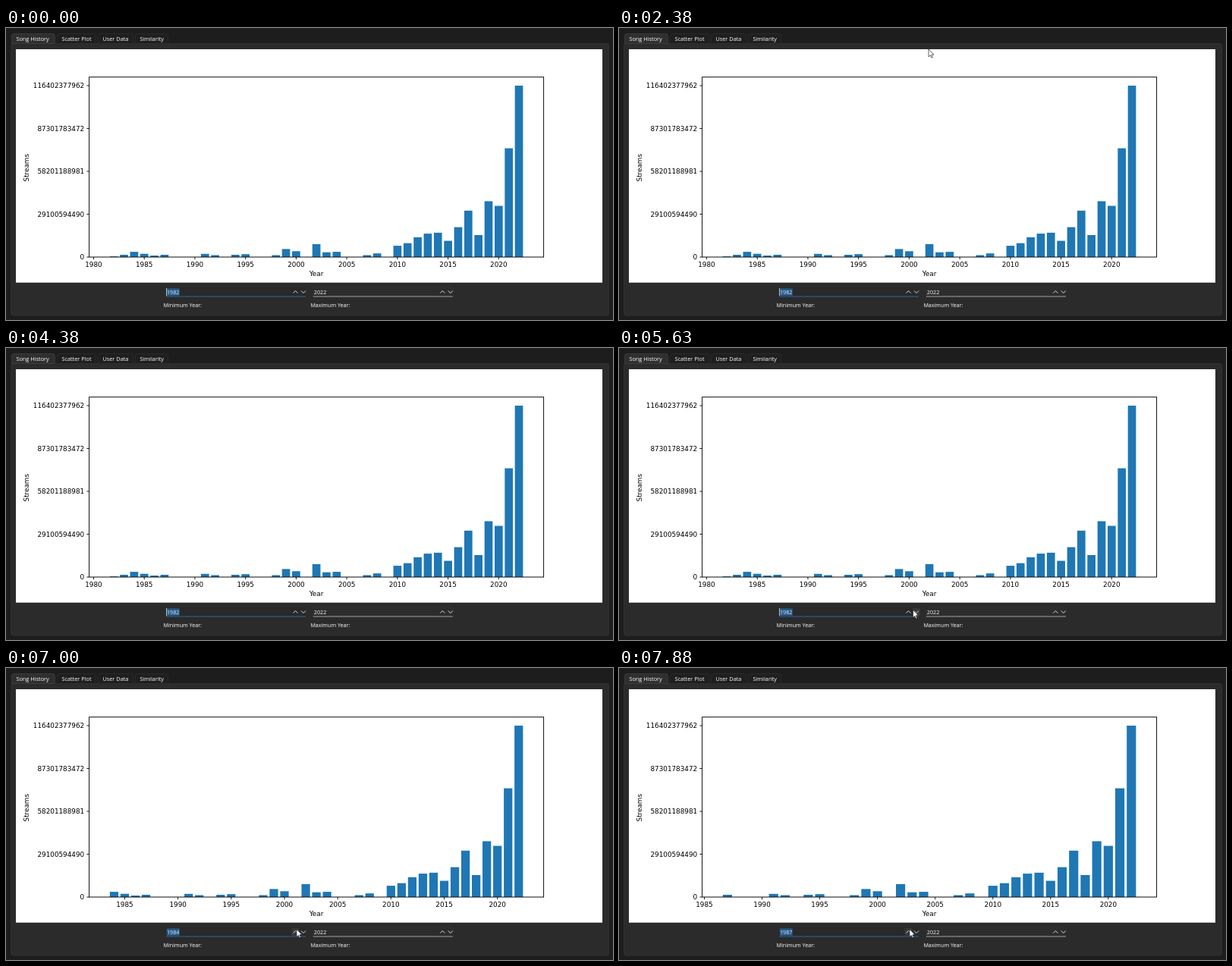
Write an HTML page with a canvas that moves like this. It is 800 px wide and 385 px high and loops after 8000 ms.

```html
<!DOCTYPE html>
<html lang="en">
<head>
<meta charset="utf-8">
<title>Song History</title>
<style>
  html, body { margin: 0; width: 100%; height: 100%; overflow: hidden; background: #1d1d1d; }
  canvas { display: block; width: 800px; height: 385px; }
</style>
</head>
<body>
<canvas id="stage" width="800" height="385"></canvas>
<script>
const ctx = document.getElementById('stage').getContext('2d');
const LOOP = 8000;
const UI_FONT = '"Open Sans", "Noto Sans", sans-serif';
const PLOT_FONT = '8.83px "DejaVu Sans", sans-serif';
const PLOT = { left: 109.6, right: 708.6, top: 64.7, bottom: 302 };
const LAST_YEAR = 2022;

// Bar heights in pixels by year
const bars = {
  1982: 0.9, 1983: 3, 1984: 6.9, 1985: 4.3, 1986: 2, 1987: 3,
  1991: 4.2, 1992: 2.5, 1994: 3, 1995: 3.8, 1998: 2.5, 1999: 10.6,
  2000: 7.7, 2002: 17, 2003: 6.3, 2004: 6.9, 2007: 2.5, 2008: 4.8,
  2010: 14.9, 2011: 18.3, 2012: 26.1, 2013: 30.9, 2014: 32.1, 2015: 21.4,
  2016: 39.4, 2017: 61.2, 2018: 29, 2019: 73.6, 2020: 67.5, 2021: 143.4, 2022: 226
};
const streamTicks = ['0', '29100594490', '58201188981', '87301783472', '116402377962'];

// Times at which the minimum year steps up by one
const yearSteps = [6380, 6750, 7250, 7630, 7880];

// Pointer visits: [time, x, y]
const visits = [
  [[2130, 404, 44], [2380, 408, 28], [2750, 408, 30], [3400, 392, 364]],
  [[5000, 402, 362], [5450, 387.5, 345.5], [5880, 387.5, 345.5], [6200, 383, 344.5], [LOOP, 383, 344.5]]
];

function fill(color, x, y, w, h) {
  ctx.fillStyle = color;
  ctx.fillRect(x, y, w, h);
}

function line(color, width, ...points) {
  ctx.strokeStyle = color;
  ctx.lineWidth = width;
  ctx.beginPath();
  points.forEach(([x, y]) => ctx.lineTo(x, y));
  ctx.stroke();
}

function text(str, x, y, font, color, align = 'left') {
  ctx.font = font;
  ctx.fillStyle = color;
  ctx.textAlign = align;
  ctx.fillText(str, x, y);
}

function box(x, y, w, h, radii, color, border) {
  ctx.beginPath();
  ctx.roundRect(x, y, w, h, radii);
  ctx.fillStyle = color;
  ctx.fill();
  ctx.strokeStyle = border;
  ctx.lineWidth = 0.7;
  ctx.stroke();
}

function drawWindow() {
  fill('#1d1d1d', 0, 0, 800, 385);
  box(6.5, 20.5, 788, 358.5, 3, '#2b2b2b', '#383838');
  const tabs = [['Song History', 7, 58], ['Scatter Plot', 67, 52], ['User Data', 121, 47], ['Similarity', 170, 44]];
  tabs.forEach(([label, x, w], i) => {
    const active = i === 0;
    box(x + 0.5, 7.5, w - 1, 13, [3, 3, 0, 0], active ? '#2f2f2f' : '#1f1f1f', active ? '#424242' : '#303030');
    text(label, x + 6.4, 17, `7.35px ${UI_FONT}`, '#fff');
  });
  fill('#fff', 13, 28, 773, 307.7);
}

function drawPlot(minYear) {
  const { left, right, top, bottom } = PLOT;
  const span = LAST_YEAR - minYear + 0.8;
  const start = minYear - 0.4 - span * 0.05;
  const unit = (right - left) / (span * 1.1);
  const xOf = year => left + (year - start) * unit;

  for (const [year, height] of Object.entries(bars)) {
    if (year >= minYear) fill('#1f77b4', xOf(year - 0.4), bottom - height, unit * 0.8, height);
  }
  for (let year = Math.ceil(start / 5) * 5; year <= LAST_YEAR; year += 5) {
    const x = xOf(year);
    line('#000', 0.9, [x, bottom], [x, bottom + 3.2]);
    text(year, x, 314.6, PLOT_FONT, '#000', 'center');
  }
  streamTicks.forEach((label, i) => {
    const y = bottom - i * 56.5;
    line('#000', 0.9, [left - 3.2, y], [left, y]);
    text(label, 103.2, y + 3.3, PLOT_FONT, '#000', 'right');
  });
  ctx.strokeStyle = '#000';
  ctx.lineWidth = 0.95;
  ctx.strokeRect(left, top, right - left, bottom - top);
  text('Year', 409, 327.4, PLOT_FONT, '#000', 'center');
  ctx.save();
  ctx.translate(30.2, 184.2);
  ctx.rotate(-Math.PI / 2);
  text('Streams', 0, 0, PLOT_FONT, '#000', 'center');
  ctx.restore();
}

function chevron(x, dir) {
  const y = 348;
  line('#e4e4e4', 0.95, [x - 3, y + dir * 1.5], [x, y - dir * 1.5], [x + 3, y + dir * 1.5]);
}

function drawSpinBox(x, value, label, focused, hover) {
  box(x, 341.5, 185.5, 13, 2, focused ? '#292929' : '#2d2d2d', '#313131');
  line(focused ? '#2c639b' : '#a0a0a0', 1, [x + 1, 354], [x + 185, 354]);
  if (focused) fill('#285987', x + 1.8, 343.3, 16.9, 9.6);
  if (hover) fill('#383838', x + (hover === 'up' ? 166.5 : 177), 343, 10, 10);
  text(value, x + 2, 350.9, `7.2px ${UI_FONT}`, focused ? '#dfebf6' : '#fff');
  chevron(x + 171.5, 1);
  chevron(x + 182, -1);
  text(label, x - 2.4, 367.6, `7.15px ${UI_FONT}`, '#fff');
}

function pointerAt(t) {
  const path = visits.find(v => t >= v[0][0] && t <= v[v.length - 1][0]);
  if (!path) return null;
  const next = Math.max(1, path.findIndex(p => p[0] >= t));
  const [a, b] = [path[next - 1], path[next]];
  const k = (t - a[0]) / (b[0] - a[0]);
  const ease = k * k * (3 - 2 * k);
  return { x: a[1] + (b[1] - a[1]) * ease, y: a[2] + (b[2] - a[2]) * ease };
}

function drawPointer({ x, y }) {
  const outline = [[0, 0], [0, 10], [2.3, 7.9], [3.9, 11.3], [5.4, 10.6], [3.9, 7.3], [7, 7.1]];
  ctx.beginPath();
  outline.forEach(([dx, dy]) => ctx.lineTo(x + dx, y + dy));
  ctx.closePath();
  ctx.fillStyle = '#fff';
  ctx.fill();
  ctx.strokeStyle = '#222';
  ctx.lineWidth = 0.7;
  ctx.stroke();
}

function draw(t) {
  const steps = yearSteps.filter(s => t >= s).length;
  const pointer = pointerAt(t);
  const hover = t < 5450 ? null : t < 6000 ? 'down' : 'up';
  drawWindow();
  drawPlot(1982 + steps);
  drawSpinBox(210, 1982 + steps, 'Minimum Year:', true, hover);
  drawSpinBox(403.8, LAST_YEAR, 'Maximum Year:', false, null);
  if (!steps) line('#e8e8e8', 0.8, [211.6, 343], [211.6, 353.2]);
  if (pointer) drawPointer(pointer);
}

function tick() {
  draw(performance.now() % LOOP);
  requestAnimationFrame(tick);
}
tick();
</script>
</body>
</html>
```
